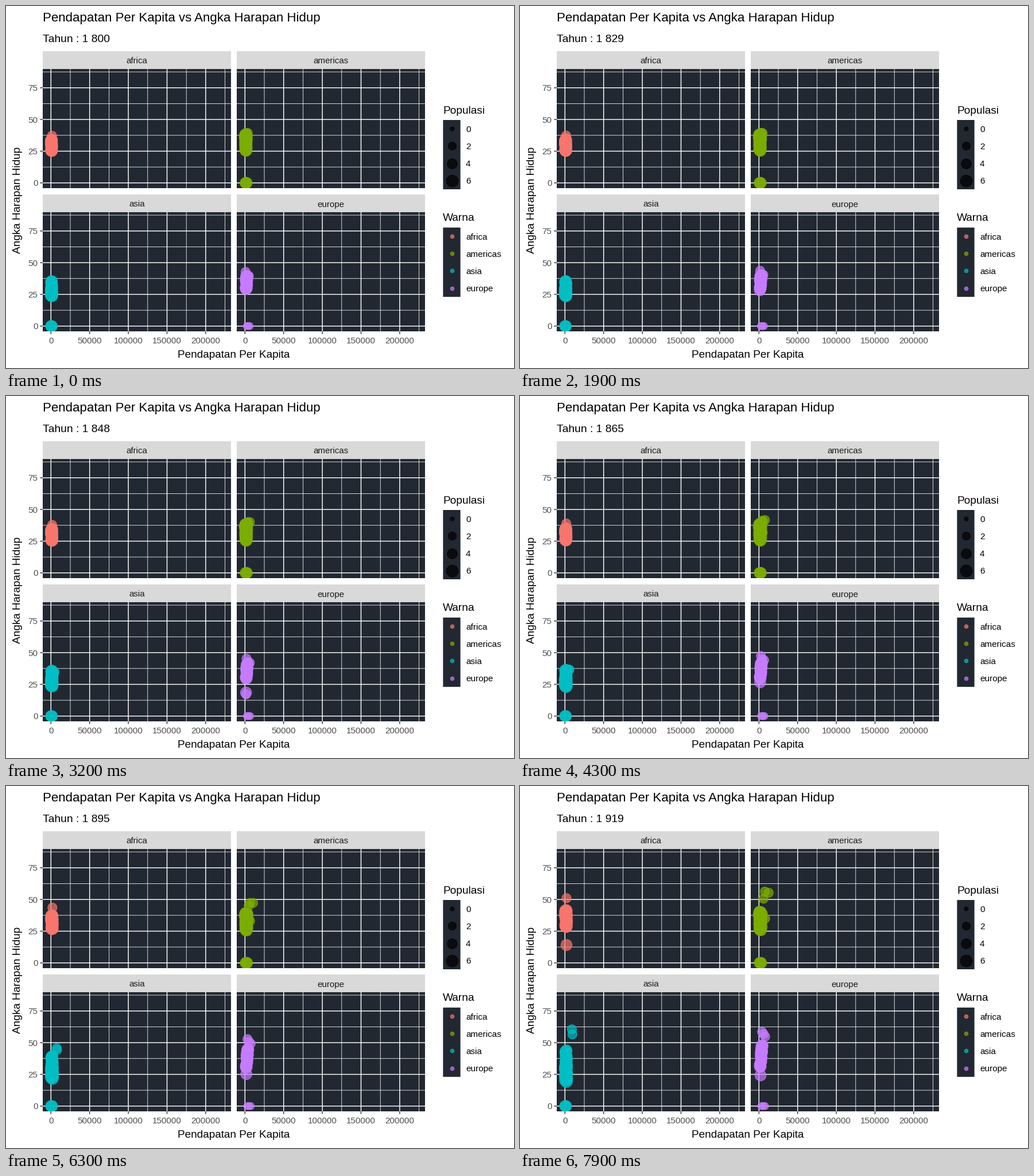
Animation, 885 px wide and 632 px high, one loop 8000 ms. Source, as a matplotlib script:

```python
import numpy as np
import matplotlib.pyplot as plt
from matplotlib.animation import FuncAnimation
from matplotlib.patches import Rectangle

W, H, DPI = 885, 632, 100
FRAMES, STEP = 80, 300 / 199          # STEP: years per frame
PX = 72 / DPI
DARK, STROKE, ALPHA = "#222831", 1.2, 0.7
COLORS = dict(africa="#F8766D", americas="#7CAE00",
              asia="#00BFC4", europe="#C77CFF")

plt.rcParams["font.family"] = "Liberation Sans"
fig = plt.figure(figsize=(W / DPI, H / DPI), dpi=DPI, facecolor="white")
ax = fig.add_axes([0, 0, 1, 1])
ax.set(xlim=(0, W), ylim=(H, 0))
ax.axis("off")


def text(x, y, s, size, ha="left", color="black", **kw):
    return ax.text(x, y, s, fontsize=size * PX, ha=ha, va="baseline",
                   color=color, **kw)


def rect(x, y, w, h, color):
    return ax.add_patch(Rectangle((x, y), w, h, fc=color, lw=0, snap=False))


def line(xs, ys, width, color="white"):
    ax.plot(xs, ys, color=color, lw=width * PX, zorder=2, snap=False,
            solid_capstyle="butt")


def dots(x, y, r, color):
    d = 2 * np.asarray(r) - STROKE
    return ax.scatter(x, y, s=(d * PX) ** 2, color=color, alpha=ALPHA,
                      linewidths=STROKE * PX, zorder=4)


def to_px(px, py, income, life):
    """Income in thousands and life expectancy to stage pixels."""
    return px + 14.3 + 1.348 * income, py + 198.8 - 2.214 * life


def panel(name, px, py):
    rect(px, py - 31, 328, 31, "#D9D9D9")
    box = rect(px, py, 328, 208, DARK)
    text(px + 164, py - 9.5, name, 15.1, "center", "#1A1A1A")
    for i in range(10):
        x, _ = to_px(px, py, 25 * i, 0)
        line([x, x], [py, py + 208], 0.8 if i % 2 else 1.45)
        if py > 300 and i % 2 == 0:
            line([x, x], [568, 572.7], 1.45, "#333333")
            text(x, 588.7, str(25000 * i), 15.1, "center", "#4D4D4D")
    for i in range(8):
        _, y = to_px(px, py, 0, 12.5 * i)
        line([px, px + 328], [y, y], 0.8 if i % 2 else 1.45)
        if px < 100 and i % 2 == 0:
            line([59.3, 64], [y, y], 1.45, "#333333")
            text(55.5, y + 5.6, f"{12.5 * i:.0f}", 15.1, "right", "#4D4D4D")
    return box


def pulse(year, peak, width):
    return max(0, 1 - abs(year - peak) / width)


def mix(pair, s):
    return pair[0] + (pair[1] - pair[0]) * s


class Group:
    """A dense column of countries, a few leaders, and some at zero.

    top, bottom: life range of the column, first and last year
    leaders: (income pair, life pair); crises: (life pair, drop, peak year)
    """

    def __init__(self, name, px, py, top, bottom, width, power, leaders,
                 zeros=(), crises=(), lean=0, radii=(9.4, 11), n=50):
        rng = np.random.default_rng(len(name))
        self.px, self.py, self.top, self.bottom = px, py, top, bottom
        self.width, self.power, self.lean = width, power, lean
        self.leaders, self.crises = leaders, crises
        self.zeros = np.linspace(*zeros, 3) if zeros else np.array([])
        self.u = rng.permutation(np.linspace(0, 1, n))
        self.v = rng.random(n)
        self.flu = rng.uniform(2, 16, n)
        zero_r = radii[0] - 2 if lean else radii[0] + 0.8
        r = np.r_[[8.6] * len(leaders),
                  np.linspace(10.3, 8.6, len(crises)),
                  [zero_r] * len(self.zeros), rng.uniform(*radii, n)]
        self.art = dots(0 * r, 0 * r, r, COLORS[name])
        self.art.set_clip_path(panel(name, px, py))

    def update(self, t, year):
        rise = t ** self.power
        income = 0.2 + self.v * mix(self.width, t)
        income += self.lean * (0.4 + t) * (1 - self.u)
        life = mix((mix(self.top, rise), mix(self.bottom, rise)), self.u)
        life = life - self.flu * pulse(year, 1918, 1)
        lead = [(mix(i, t), mix(y, rise)) for i, y in self.leaders]
        lead += [(1 + t, mix(y, t) - drop * pulse(year, peak, 2))
                 for y, drop, peak in self.crises]
        lead += [(z * (1 + 0.3 * t), 0) for z in self.zeros]
        points = np.vstack([lead, np.column_stack([income, life])])
        xy = to_px(self.px, self.py, points[:, 0], points[:, 1])
        self.art.set_offsets(np.column_stack(xy))


groups = [
    Group("africa", 64, 110, (33.7, 41.4), (25.2, 28.3), (1, 2.2), 3.4,
          leaders=[((1.3, 2), (37.2, 51)), ((1, 3), (34.5, 39.5))],
          crises=[((34, 36), 23, 1919)]),
    Group("americas", 402, 110, (38.3, 40.5), (25.2, 25.6), (2, 3.2), 3,
          leaders=[((1.3, 5.9), (39.3, 50.6)), ((2, 12.6), (39, 55.3)),
                   ((2, 7.6), (38, 56.2)), ((3.6, 4), (39.3, 39.5)),
                   ((1, 8), (31, 35))],
          zeros=(0.7, 2.2)),
    Group("asia", 64, 360, (35.5, 44), (23.8, 19.3), (1.2, 2.4), 3.4,
          leaders=[((1, 9.7), (33.8, 56.5)), ((1, 9), (33, 60.5))],
          zeros=(0.1, 1.2)),
    Group("europe", 402, 360, (39.5, 48), (29.2, 30.6), (2.4, 2.2), 2,
          leaders=[((0.8, 4), (42.7, 58.5)), ((5, 8), (39.5, 54.8)),
                   ((2, 6), (40, 56.7))],
          zeros=(2.3, 6), lean=2, radii=(8.8, 10.5),
          crises=[((29.5, 24.2), 10, 1848), ((33, 33), 18, 1848)]),
]

text(64, 27, "Pendapatan Per Kapita vs Angka Harapan Hidup", 22.25)
label = text(64, 63, "", 19.3)
text(396.8, 614, "Pendapatan Per Kapita", 19, "center")
text(25, 339.3, "Angka Harapan Hidup", 19, "center", rotation=90,
     rotation_mode="anchor")


def legend(title, top, names, radii, colors):
    text(761, top - 11.5, title, 19.1)
    rect(761.4, top, 30.25, 121, DARK)
    for i, (name, r, color) in enumerate(zip(names, radii, colors)):
        y = top + 15.1 + 30.25 * i
        dots([776.5], [y], [r], color)
        text(801, y + 5.6, name, 15.2)


legend("Populasi", 199, "0246", [4.1, 7.6, 9.3, 10.9], ["black"] * 4)
legend("Warna", 386.8, COLORS, [3.8] * 4, COLORS.values())


def update(k):
    t, now = k / (FRAMES - 1), 1800 + STEP * k
    year = round(now)
    label.set_text(f"Tahun : {year // 1000} {year % 1000:03d}")
    for g in groups:
        g.update(t, now)


anim = FuncAnimation(fig, update, frames=FRAMES, interval=100, repeat=True,
                     repeat_delay=0)
plt.show()
```
